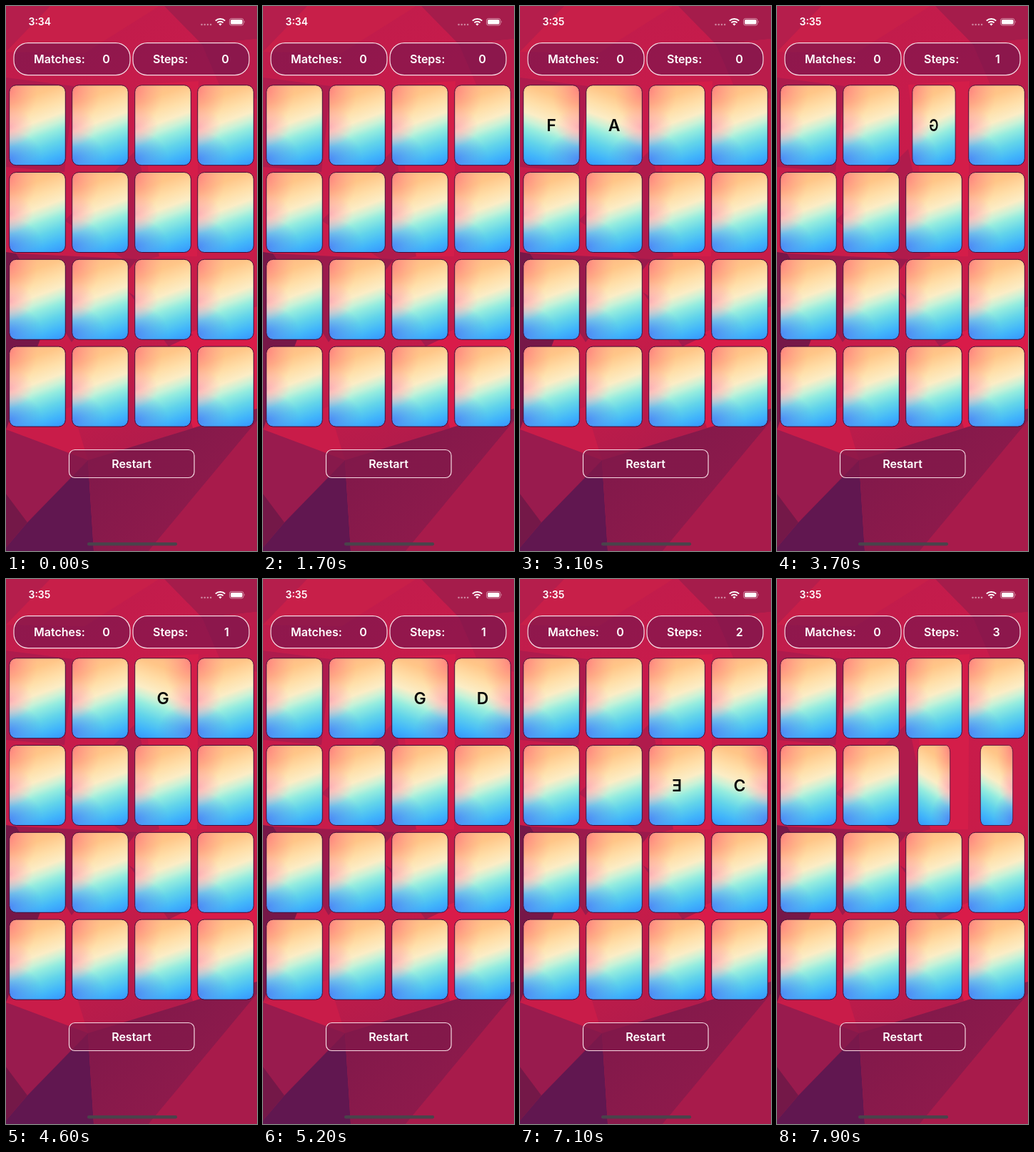
An HTML page that plays this animation: 352x762 px, repeating every 8000 ms.

```html
<!DOCTYPE html>
<html lang="en">
<head>
<meta charset="utf-8">
<title>Memory cards</title>
<style>
html, body { margin: 0; width: 100%; height: 100%; overflow: hidden; background: #b81c4b; }
svg { display: block; font-family: Inter, Roboto, sans-serif; font-weight: 600; }
</style>
</head>
<body>
<svg width="352" height="762" viewBox="0 0 352 762">
  <defs>
    <linearGradient id="base" x2="0.25" y2="1">
      <stop offset="0" stop-color="#bd1d4c"/>
      <stop offset=".3" stop-color="#c81b4b"/>
      <stop offset=".65" stop-color="#c81c49"/>
      <stop offset="1" stop-color="#a91b4c"/>
    </linearGradient>
    <linearGradient id="slope" x2="1" y2="1">
      <stop offset="0" stop-color="#7c184a"/>
      <stop offset="1" stop-color="#961b4c"/>
    </linearGradient>
    <linearGradient id="sky" gradientUnits="userSpaceOnUse" x1="-22" y1="-62" x2="22" y2="62">
      <stop offset="0" stop-color="#ffb584"/>
      <stop offset=".19" stop-color="#ffc688"/>
      <stop offset=".34" stop-color="#ffdfa9"/>
      <stop offset=".46" stop-color="#fbedc6"/>
      <stop offset=".55" stop-color="#c6f2d8"/>
      <stop offset=".62" stop-color="#94ecdf"/>
      <stop offset=".74" stop-color="#62d4ea"/>
      <stop offset=".87" stop-color="#42b6fa"/>
      <stop offset="1" stop-color="#3494ff"/>
    </linearGradient>
    <radialGradient id="coral" cx="0" cy="0" r="1" gradientTransform="translate(0 .05) scale(.5 .5)">
      <stop offset="0" stop-color="#ff747c" stop-opacity=".75"/>
      <stop offset="1" stop-color="#ff9a8c" stop-opacity="0"/>
    </radialGradient>
    <radialGradient id="pink" cx="0" cy="0" r="1" gradientTransform="translate(0 .52) scale(.42 .25)">
      <stop offset="0" stop-color="#ff9fb4" stop-opacity=".75"/>
      <stop offset="1" stop-color="#ffa8b8" stop-opacity="0"/>
    </radialGradient>
    <radialGradient id="blue" cx="0" cy="0" r="1" gradientTransform="translate(0 .93) scale(.6 .36)">
      <stop offset="0" stop-color="#4a7cf8" stop-opacity=".85"/>
      <stop offset="1" stop-color="#4a8cf8" stop-opacity="0"/>
    </radialGradient>
    <rect id="face" x="-39.3" y="-56" width="78.6" height="112" rx="9.5"/>
    <g id="card">
      <use href="#face" fill="url(#sky)"/>
      <use href="#face" fill="url(#coral)"/>
      <use href="#face" fill="url(#blue)"/>
      <use href="#face" fill="url(#pink)"/>
      <use href="#face" fill="none" stroke="#420c38"/>
    </g>
  </defs>
  <rect width="352" height="762" fill="url(#base)"/>
  <g id="facets"></g>
  <g fill="#55124e" fill-opacity=".45" stroke="#f6d9e2" stroke-width="1.2">
    <rect x="11" y="51.6" width="163" height="45" rx="20"/>
    <rect x="178" y="51.6" width="163" height="45" rx="20"/>
    <rect x="88.5" y="620.5" width="175.5" height="39" rx="8" fill="#82184a" fill-opacity=".75"/>
  </g>
  <g fill="#fff" font-size="16">
    <text x="39" y="79.7">Matches:</text>
    <text x="145.7" y="79.7" text-anchor="end">0</text>
    <text x="206" y="79.7">Steps:</text>
    <text id="steps" x="312.7" y="79.7" text-anchor="end">0</text>
    <text x="176" y="645.7" text-anchor="middle">Restart</text>
    <text id="clock" x="31.5" y="27.4" font-size="14">3:34</text>
  </g>
  <g fill="#fff" fill-opacity=".45">
    <circle cx="274.5" cy="26" r="1.3"/><circle cx="278.7" cy="26" r="1.3"/>
    <circle cx="282.9" cy="26" r="1.3"/><circle cx="287.1" cy="26" r="1.3"/>
  </g>
  <g fill="none" stroke="#fff" stroke-width="2">
    <path d="M293.8 20.6a9.6 9.6 0 0 1 13.4 0"/>
    <path d="M296.4 23.4a5.8 5.8 0 0 1 8.2 0"/>
  </g>
  <path d="M300.5 27.6l-2.2-2.3a3.1 3.1 0 0 1 4.4 0z" fill="#fff"/>
  <rect x="313.5" y="17.5" width="19.5" height="9.5" rx="2.8" fill="none" stroke="#fff" stroke-opacity=".5"/>
  <rect x="315" y="19" width="16.5" height="6.5" rx="1.6" fill="#fff"/>
  <path d="M334.3 20.6q1.4 1.6 0 3.2z" fill="#fff" fill-opacity=".6"/>
  <g id="cards" font-size="23" text-anchor="middle" fill="#080808"></g>
  <rect x="114" y="750" width="126" height="4.4" rx="2.2" fill="#4a434b"/>
</svg>
<script>
const LOOP = 8000, FLIP = 500;
const byId = id => document.getElementById(id);
const steps = byId('steps'), clock = byId('clock');

const facets = [
  ['#b51e4c', '0,0 62,0 0,64'],
  ['#c81f49', '62,0 215,0 110,66 0,64'],
  ['#a51c4b', '222,0 352,0 352,46 275,54'],
  ['#ba1c4b', '275,54 352,46 352,130 300,112'],
  ['#ae1b4d', '0,100 95,112 82,232 0,225'],
  ['#b01b4c', '82,300 184,200 215,350 175,360'],
  ['#d41d49', '184,110 270,105 268,350 215,350'],
  ['#761748', '0,344 14,346 88,420 48,466 0,592'],
  ['#9b1a4c', '14,346 184,354 92,470'],
  ['#d91b49', '228,468 352,420 352,563 262,590'],
  ['#a31b4c', '172,400 262,460 228,476'],
  ['#c91c49', '0,592 92,560 115,635'],
  ['#991b4e', '0,592 115,635 30,722 0,682'],
  ['#741848', '0,682 30,722 0,757'],
  ['#611750', '115,635 123,762 0,762 0,757 30,722'],
  ['url(#slope)', '115,635 352,563 352,580 200,762 123,762'],
  ['#a81b4b', '352,580 352,762 200,762']
];
byId('facets').innerHTML = facets
  .map(([fill, points]) => `<polygon fill="${fill}" points="${points}"/>`).join('');

// slot, letter, time opened, time closed
const turns = [
  [0, 'F', 1760, 3130], [1, 'A', 2470, 3130],
  [2, 'G', 3545, 5340], [3, 'D', 4680, 5340],
  [7, 'C', 5875, 7715], [6, 'E', 7050, 7715]
];
const closings = [3130, 5340, 7715];

// The letter sits on the back, so it reads correctly once turned over.
byId('cards').innerHTML = Array.from({ length: 16 }, (_, i) => {
  const x = 44 + (i % 4) * 88, y = 166.7 + Math.floor(i / 4) * 121.8;
  return `<g transform="translate(${x} ${y})"><g>
    <use href="#card"/><text y="8.4" transform="scale(-1 1)"></text></g></g>`;
}).join('');
const cards = [...byId('cards').children].map(slot => slot.firstElementChild);

function ease(ms) {
  const p = Math.min(1, Math.max(0, ms / FLIP));
  return (1 - Math.cos(Math.PI * p)) / 2;
}

function draw(t) {
  for (const [slot, letter, open, close] of turns) {
    const turn = ease(t - open) - ease(t - close);
    cards[slot].setAttribute('transform', `scale(${Math.cos(Math.PI * turn)} 1)`);
    cards[slot].lastElementChild.textContent = t > open && t < close ? letter : '';
  }
  steps.textContent = closings.filter(c => t >= c).length;
  clock.textContent = t < 2300 ? '3:34' : '3:35';
}

const start = performance.now();
function tick() {
  draw((performance.now() - start) % LOOP);
  requestAnimationFrame(tick);
}
tick();
</script>
</body>
</html>
```
